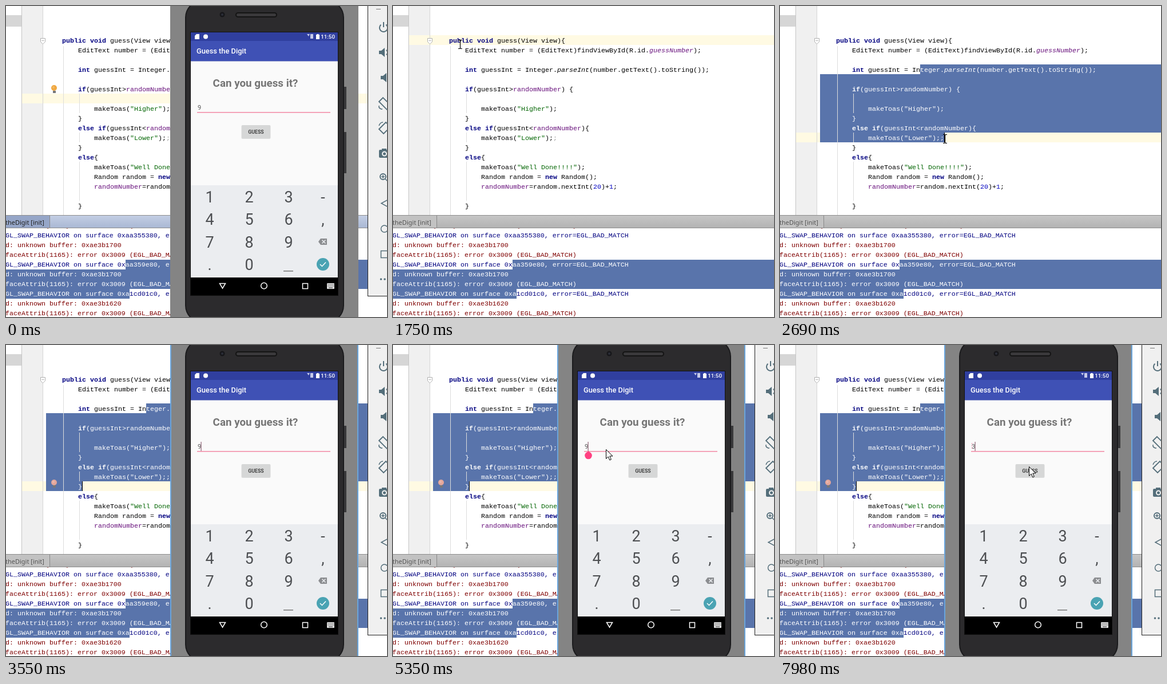
Recreate the animation shown at these times as an HTML page with a canvas. Size 666 by 543 pixels, loop 8 s.

```html
<!DOCTYPE html>
<html>
<head>
<meta charset="utf-8">
<style>
html, body { margin: 0; width: 100%; height: 100%; overflow: hidden; background: #fff }
canvas { display: block }
</style>
</head>
<body>
<canvas id="stage" width="666" height="543"></canvas>
<script>
const c = document.getElementById('stage').getContext('2d');
const LOOP = 8000, HIDE = 1750, SHOW = 3550;
const ROW = 17, CH = 7, LEFT = 70, TOP = 51, LOG_TOP = 392;
const BLUE = '#5974ab', NAVY = '#000080', RED = '#7f0000', SLATE = '#546e7a', CREAM = '#fffae3';
const MONO = '11.667px "Liberation Mono", monospace';

const code = [
  '    public void guess(View view){',
  '        EditText number = (EditText)findViewById(R.id.guessNumber);',
  '',
  '        int guessInt = Integer.parseInt(number.getText().toString());',
  '',
  '        if(guessInt>randomNumber) {',
  '',
  '            makeToas("Higher");',
  '        }',
  '        else if(guessInt<randomNumber){',
  '            makeToas("Lower");;',
  '        }',
  '        else{',
  '            makeToas("Well Done!!!!");',
  '            Random random = new Random();',
  '            randomNumber=random.nextInt(20)+1;',
  '',
  '        }'
];
const swap = id => ['GL_SWAP_BEHAVIOR on surface ' + id + ', error=EGL_BAD_MATCH', NAVY];
const buffer = id => ['d: unknown buffer: ' + id, RED];
const attrib = ['faceAttrib(1165): error 0x3009 (EGL_BAD_MATCH)', RED];
const log = [
  attrib, swap('0xaa355380'), buffer('0xae3b1700'), attrib, swap('0xaa359e80'),
  buffer('0xae3b1700'), attrib, swap('0xa1cd01c0'), buffer('0xae3b1620'), attrib
];
// pattern, colour, font prefix
const styles = [
  [/^(public|void|int|if|else|new)$/, NAVY, 'bold '],
  [/^"/, '#006400', ''],
  [/^guessNumber$/, '#660e7a', 'italic '],
  [/^randomNumber$/, '#660e7a', ''],
  [/^parseInt$/, '#000', 'italic '],
  [/^\d+$/, '#0000c0', '']
];

// pointer paths: [time, x, y]
const paths = [
  [[640, 418, 488], [1430, 126, 92], [1670, 116, 69], [1990, 118, 62], [2370, 244, 111],
   [2460, 274, 117], [2690, 288, 232], [2760, 288, 236], [2840, 270, 246], [2990, 170, 415]],
  [[3860, 450, 390], [4240, 353, 140], [4400, 353, 140], [4480, 361, 167], [4870, 361, 168],
   [4950, 372, 182], [5580, 372, 182]],
  [[7280, 440, 232], [7600, 438, 224], [7970, 435, 212], [8000, 435, 212]]
];
const blinks = [[180, 690], [1180, 1430], [3550, 4160], [4640, 5600], [6200, 6670], [6900, 7440], [7940, 8000]];

function pointerAt(t) {
  const path = paths.find(p => t >= p[0][0] && t < p[p.length - 1][0]);
  if (!path) return null;
  const i = path.findIndex(p => p[0] > t), a = path[i - 1], b = path[i];
  const k = (t - a[0]) / (b[0] - a[0]);
  return [1, 2].map(j => Math.round(a[j] + (b[j] - a[j]) * k));
}

function box(x, y, w, h, color) {
  c.fillStyle = color;
  c.fillRect(x, y, w, h);
}
function pill(x, y, w, h, r, color) {
  c.beginPath();
  c.roundRect(x, y, w, h, r);
  c.fillStyle = color;
  c.fill();
}
function disc(x, y, r, color) {
  c.beginPath();
  c.arc(x, y, r, 0, 7);
  c.fillStyle = color;
  c.fill();
}
function ring(x, y, r, color, width = 1.5, from = 0, to = Math.PI * 2) {
  c.beginPath();
  c.arc(x, y, r, from, to);
  c.strokeStyle = color;
  c.lineWidth = width;
  c.stroke();
}
function shape(d, fill, stroke, width = 1.5, x = 0, y = 0) {
  const p = new Path2D(d);
  c.save();
  c.translate(x, y);
  if (fill) { c.fillStyle = fill; c.fill(p); }
  if (stroke) { c.strokeStyle = stroke; c.lineWidth = width; c.stroke(p); }
  c.restore();
}
function text(s, x, y, font, color, align = 'left') {
  c.font = font;
  c.fillStyle = color;
  c.textAlign = align;
  c.fillText(s, x, y);
}

function drawCode(color) {
  code.forEach((line, row) => {
    for (const m of line.matchAll(/"[^"]*"|\w+|[^\w\s"]/g)) {
      const [, ink, face] = styles.find(s => s[0].test(m[0])) || [0, '#000', ''];
      const spare = line.slice(m.index - 1, m.index + 1) == ';;';
      text(m[0], LEFT + m.index * CH, TOP + row * ROW + 13, face + MONO, color || (spare ? '#999' : ink));
    }
  });
}
function drawLog(color) {
  log.forEach(([s, ink], i) => text(s, -1, LOG_TOP + (i - 1) * ROW + 12, MONO, color || ink));
}
// fills the [x, y, w, h] areas and redraws the text inside them in white
function select(areas, draw) {
  c.save();
  c.beginPath();
  areas.forEach(a => c.rect(...a));
  c.clip();
  box(0, 0, 666, 543, BLUE);
  draw('#fff');
  c.restore();
}

// caret row and end x of the dragged selection
function dragEnd(t) {
  if (t < 2370) return null;
  if (t >= 2840) return [11, LEFT + 9 * CH];
  const [x, y] = pointerAt(t), row = Math.floor((y - TOP) / ROW);
  const col = Math.min(Math.round((x - LEFT) / CH), code[row].length);
  return [row, LEFT + col * CH];
}

function bulb(y, color) {
  disc(84, y - 2, 5, color);
  disc(83, y - 3, 2, '#fff3');
  box(82, y + 3, 5, 4, '#777');
}

function editor(t) {
  box(0, 0, 666, 543, '#fff');
  box(0, 16, 27, 20, '#d6d6d6');
  box(28, 0, 37, 366, '#f0f0f0');
  box(27, 0, 1, 366, '#c4c4c4');

  const end = dragEnd(t);
  const row = end ? end[0] : t < HIDE ? 6 : 0;
  box(28, TOP + row * ROW, 638, ROW, CREAM);
  box(64, 0, 1, 366, '#d4d4d4');
  drawCode();
  if (end) {
    const y = TOP + row * ROW, first = TOP + 3 * ROW, x0 = 245;
    const areas = row > 3
      ? [[x0, first, 421, ROW], [LEFT, first + ROW, 596, y - first - ROW], [LEFT, y, end[1] - LEFT, ROW]]
      : [[Math.min(x0, end[1]), first, Math.abs(end[1] - x0), ROW]];
    select(areas, drawCode);
    box(end[1], y, 1, ROW, '#000');
  }
  [[100, 70, 296], [128, 153, 34], [128, 221, 17], [128, 272, 68]]
    .forEach(([x, y, h]) => box(x, y, 1, h, '#dcdcdc'));
  shape('M60.5 56.5h8v6l-4 4-4-4zM62.5 60.5h4', '#fff', '#b0b0b0', 1);
  if (t < HIDE) bulb(145, '#f0a840');
  if (t >= SHOW) bulb(242, '#e5a79a');
}

function consolePane(active) {
  c.save();
  c.beginPath();
  c.rect(0, 388, 666, 155);
  c.clip();
  box(0, 388, 666, 155, '#fff');
  drawLog();
  const y = LOG_TOP + 3 * ROW;
  select([[209, y, 457, ROW], [0, y + ROW, 666, 2 * ROW], [0, y + 3 * ROW, 216, ROW]], drawLog);
  c.restore();

  const g = c.createLinearGradient(0, 366, 0, 388);
  g.addColorStop(0, active ? '#c3cee4' : '#c6c6c6');
  g.addColorStop(1, active ? '#a9b7d3' : '#b2b2b2');
  box(0, 366, 666, 22, g);
  box(0, 365, 666, 1, '#8c8c8c');
  box(0, 387, 666, 1, '#8c8c8c');
  box(0, 366, 76, 21, active ? '#96a6c8' : '#c2c2c2');
  box(76, 366, 1, 21, '#888');
  text('theDigit [init]', -1, 382, '11px "Noto Sans", sans-serif', active ? '#222' : '#555');
}

function toolbar() {
  box(632, 0, 34, 507, '#222');
  box(633, 0, 33, 506, '#f0f0f0');
  box(647, 5, 8, 1, '#777');
  ring(660, 38, 7, SLATE, 2, -0.9, 4);
  box(659, 28, 2, 9, SLATE);
  shape('M652 78h4l6-5v16l-6-5h-4z', SLATE);
  ring(662, 81, 5, SLATE, 2, -1, 1);
  shape('M655 122h4l6-5v16l-6-5h-4z', SLATE);
  shape('M652 167l7-7 14 14-7 7z', null, SLATE, 1.8);
  shape('M652 174v3q2 3 6 3', null, SLATE);
  shape('M652 215l12-12 8 8-12 12z', null, SLATE, 1.8);
  shape('M652 209q2-6 7-6', null, SLATE);
  pill(652, 251, 18, 14, 2, SLATE);
  box(657, 249, 8, 3, SLATE);
  ring(661.5, 258, 3.5, '#f0f0f0', 2);
  ring(659, 298, 5, SLATE, 2);
  shape('M663 302l5 5M656 298h6M659 295v6', null, SLATE);
  shape('M668 338v13l-12-6.5z', null, SLATE);
  ring(661.5, 389, 6, SLATE);
  shape('M655.5 427.5h12v12h-12z', null, SLATE);
  [655.5, 662, 668.5].forEach(x => disc(x, 477, 1.8, SLATE));
}

function keypad() {
  box(323, 313, 257, 161, '#ebedf0');
  const font = '27px Roboto, sans-serif', xs = [356, 425, 494, 554];
  ['123-', '456,', '789', '.0'].forEach((keys, r) => [...keys].forEach((k, i) =>
    text(k, xs[i], 343 + r * 39.3, font, '#4d4f52', 'center')));
  box(485, 462, 17, 1.5, '#777');
  shape('M546 411.5l4-5.5h11v11h-11z', '#8b8d90');
  shape('M552.5 408.5l6 6m0-6l-6 6', null, '#ebedf0');
  disc(554, 451, 11, '#4aa3b3');
  shape('M549 451l3.5 3.5 6.5-7', null, '#fff');
}

function entry(t) {
  const erased = t >= 6670 && t < 6900;
  if (!erased) text(t < 6670 ? '9' : '3', 335, 181, '11px Roboto, sans-serif', '#555');
  box(334, 185, 233, 1.6, '#f28fa9');
  if (blinks.some(([a, b]) => t >= a && t < b)) box(340.5, 169, 1.2, 16, '#8f6577');
  if (t >= 7940) [171, 175, 179].forEach(y => box(335, y, 1, 2, '#f093ae'));
  if (t >= 5180 && t < 6670) {
    disc(341.5, 193, 6.3, '#ff4081');
    shape('M341.5 185l4.5 4h-9z', '#ff4081');
  }
}

function phone(t) {
  box(287, 0, 329, 543, '#848484');
  if (t >= SHOW) [287, 614].forEach(x => box(x, 0, 2, 543, '#6aa5dc'));
  [[141, 39], [220, 72]].forEach(([y, h]) => box(588, y, 7, h, '#39393b'));
  pill(313, -10, 278, 563, 30, '#1b1b1d');
  pill(315, -8, 274, 559, 28, '#2c2b2d');
  pill(401, 11, 73, 9, 4.5, '#141414');
  pill(403, 13, 69, 5, 2.5, '#3a393b');
  disc(378, 15, 4.5, '#17171a');
  disc(378, 15, 2, '#2b2e38');

  box(322, 45, 259, 461, '#111');
  box(323, 46, 257, 50, '#3f51b5');
  box(323, 46, 257, 15, '#303f9f');
  box(323, 96, 257, 217, '#fafafa');
  box(323, 96, 257, 1, '#a3abd3');
  shape('M333 49h5v9h-8v-6z', '#fff');
  disc(349, 53.5, 4, '#fff');
  shape('M526 49h5l-2 4zM532 57v-8h5v8z', '#c5cae9');
  box(542, 50, 6, 8, '#fff');
  box(543.5, 49, 3, 1, '#fff');
  text('11:50', 575, 57, '500 9.8px Roboto, sans-serif', '#fff', 'right');
  text('Guess the Digit', 333, 83, '500 12.8px Roboto, sans-serif', '#fff');
  text('Can you guess it?', 436, 141, 'bold 18.8px Roboto, sans-serif', '#757575', 'center');
  entry(t);
  pill(411.5, 208, 51, 24, 2, '#dcdcdc');
  pill(412, 208, 50, 23, 2, '#d6d7d7');
  text('GUESS', 437, 222.5, 'bold 8.8px Roboto, sans-serif', '#444', 'center');
  keypad();

  box(323, 474, 257, 31, '#000');
  shape('M373.5 484.5h10l-5 8.5z', null, '#fff');
  ring(451, 488.5, 5.3, '#fff');
  shape('M518.5 484.5h9v9h-9z', null, '#fff');
  pill(561, 484, 13, 10, 1, '#ddd');
  [486, 488.5].forEach(y => { for (let x = 562.5; x < 573; x += 2) box(x, y, 1, 1, '#333'); });
  box(564, 491.5, 7, 1, '#333');
  toolbar();
}

function pointer(x, y, arrow) {
  if (arrow) shape('M.5 .5v16l3.7-3.5 2.6 6 2.6-1.1-2.6-5.9h5.2z', '#fff', '#000', 1, x, y);
  else shape('M-3.5-7.5h2.5l1 1 1-1h2.5M0-7v14M-3.5 7.5h2.5l1-1 1 1h2.5', null, '#000', 1.2, x + 0.5, y);
}

function frame(now) {
  const t = now % LOOP, open = t < HIDE || t >= SHOW;
  editor(t);
  consolePane(t < HIDE);
  if (open) phone(t);
  const p = pointerAt(t);
  if (p) pointer(...p, open && p[0] > 288);
  requestAnimationFrame(frame);
}
requestAnimationFrame(frame);
</script>
</body>
</html>
```
